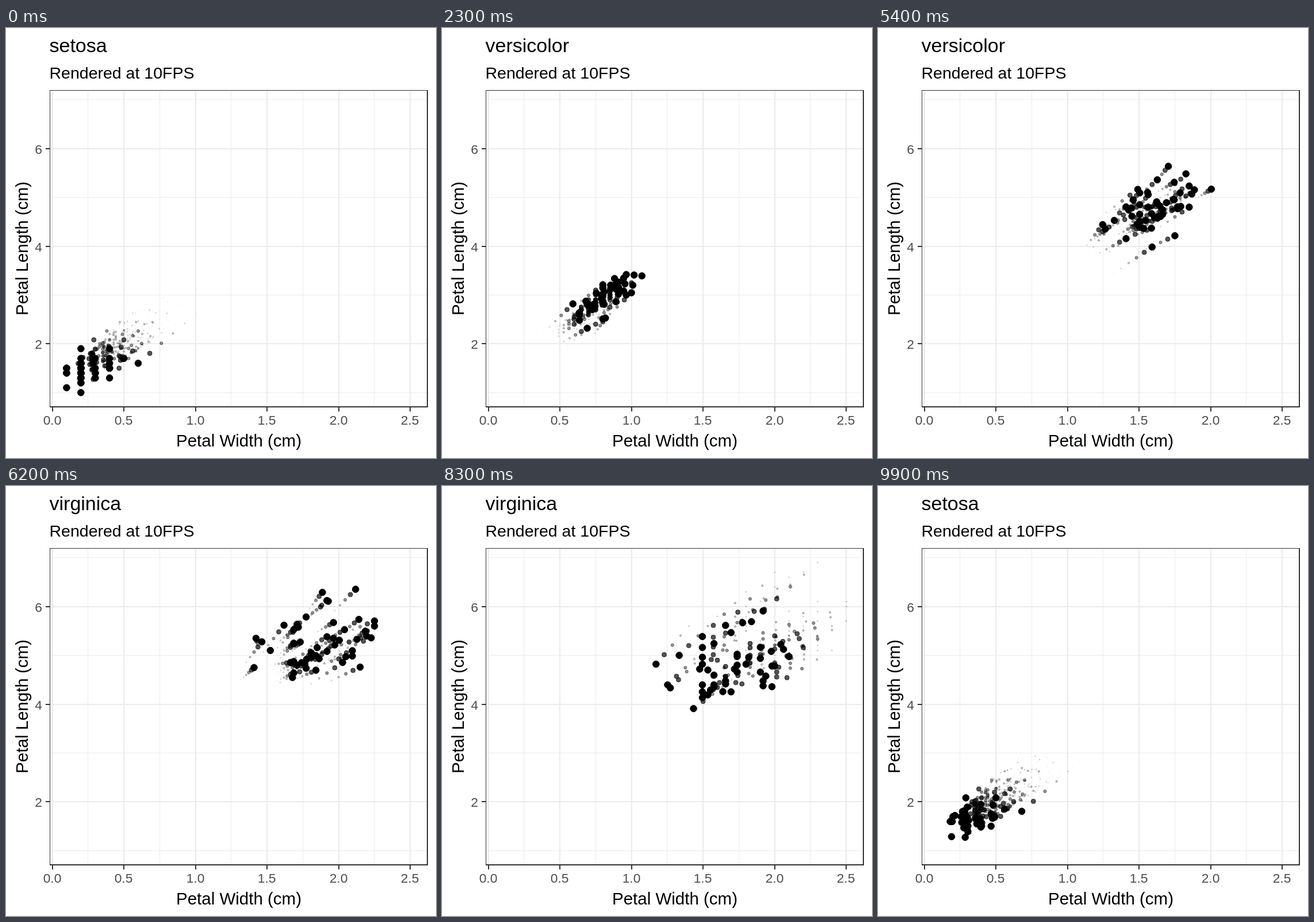
Recreate the animation shown at these times as an HTML page with a canvas. Size 748 px wide and 748 px high, loop 10000 ms.

```html
<!DOCTYPE html>
<html lang="en">
<head>
<meta charset="utf-8">
<title>Iris petals</title>
<style>
html, body { margin: 0; width: 100%; height: 100%; overflow: hidden; background: #fff; }
svg, canvas { position: absolute; left: 0; top: 0; width: 748px; height: 748px; }
text { font-family: "Liberation Sans", Arial, sans-serif; }
.label { font-size: 29.5px; text-anchor: middle; }
.tick { font-size: 22.8px; fill: #4d4d4d; }
</style>
</head>
<body>
<svg viewBox="0 0 748 748">
  <g id="grid" shape-rendering="crispEdges"></g>
  <g fill="#333" shape-rendering="crispEdges">
    <path d="M76 108h658v1H76zM76 108h1v552h-1zM732 108h2v552h-2zM76 658h658v2H76z"/>
  </g>
  <text id="title" x="75.5" y="42" font-size="34"></text>
  <text x="75.5" y="88" font-size="28.5">Rendered at 10FPS</text>
  <text class="label" x="405" y="727.5">Petal Width (cm)</text>
  <text class="label" transform="translate(38 383.5) rotate(-90)">Petal Length (cm)</text>
</svg>
<canvas width="748" height="748"></canvas>
<script>
// Petal sizes in mm, one row per flower
const setosa = {
  w: [2,2,2,2,2,4,3,2,2,1,2,2,1,1,2,4,4,3,3,3,2,4,2,5,2,2,4,2,2,2,2,4,1,2,2,2,2,1,2,2,3,3,2,6,4,3,2,2,2,2],
  l: [14,14,13,15,14,17,14,15,14,15,15,16,14,11,12,15,13,14,17,15,17,15,10,17,19,
      16,16,15,14,16,16,15,15,14,15,12,13,14,13,15,13,13,13,16,19,14,16,14,15,14]
};
const versicolor = {
  w: [14,15,15,13,15,13,16,10,13,14,10,15,10,14,13,14,15,10,15,11,18,13,15,12,13,
      14,14,17,15,10,11,10,12,16,15,16,15,13,13,13,12,14,12,10,13,12,13,13,11,13],
  l: [47,45,49,40,46,45,47,33,46,39,35,42,40,47,36,44,45,41,45,39,48,40,49,47,43,
      44,48,50,45,35,38,37,39,51,45,45,47,44,41,40,44,46,40,33,42,42,42,43,30,41]
};
const virginica = {
  w: [25,19,21,18,22,21,17,18,18,25,20,19,21,20,24,23,18,22,23,15,23,20,20,18,21,
      18,18,18,21,16,19,20,22,15,14,23,24,18,18,21,24,23,19,23,25,23,19,20,23,18],
  l: [60,51,59,56,58,66,45,63,58,61,51,53,55,50,51,53,55,67,69,50,57,49,67,49,57,
      60,48,49,56,58,61,64,56,51,56,61,56,55,48,54,56,51,51,59,57,52,50,52,54,51]
};

const moves = [
  { from: setosa, to: versicolor, start: 11, end: 33 },
  { from: versicolor, to: virginica, start: 45, end: 67 },
  { from: virginica, to: setosa, start: 79, end: 100 }
];
const FRAMES = 100, WAKE = 8;
const px = w => 80.5 + 249.1 * w;
const py = l => 719.1 - 84.9 * l;

const grid = document.getElementById("grid");
const title = document.getElementById("title");
const ctx = document.querySelector("canvas").getContext("2d");

function add(tag, attrs, content = "") {
  const el = document.createElementNS("http://www.w3.org/2000/svg", tag);
  for (const key in attrs) el.setAttribute(key, attrs[key]);
  el.textContent = content;
  grid.append(el);
}
const rect = (x, y, width, height, fill) => add("rect", { x, y, width, height, fill });

function drawGrid() {
  const pale = "#ebebeb", dark = "#333";
  for (let w = 0.25; w < 2.5; w += 0.5) rect(Math.floor(px(w)), 108, 1, 551, pale);
  for (let l = 1; l < 8; l += 2) rect(76, Math.floor(py(l)), 657, 1, pale);
  for (let l = 2; l < 7; l += 2) {
    const y = Math.round(py(l));
    rect(76, y - 1, 657, 2, pale);
    rect(69, y - 1, 7, 2, dark);
    add("text", { class: "tick", x: 63, y: y + 8.5, "text-anchor": "end" }, l);
  }
  for (let w = 0; w < 3; w += 0.5) {
    const x = Math.round(px(w));
    rect(x - 1, 108, 2, 551, pale);
    rect(x - 1, 660, 2, 7, dark);
    add("text", { class: "tick", x: x - 0.5, y: 690, "text-anchor": "middle" }, w.toFixed(1));
  }
}

// strength 1 is a full dot; older echoes shrink and fade
function drawFlowers(frame, strength) {
  const f = (frame + FRAMES) % FRAMES;
  const { from, to, start, end } = moves.find(m => f < m.end);
  const p = Math.max(0, (f - start) / (end - start));
  const radius = 0.3 + 5.5 * strength;
  ctx.globalAlpha = strength;
  from.w.forEach((w, i) => {
    const x = px((w + (to.w[i] - w) * p) / 10);
    const y = py((from.l[i] + (to.l[i] - from.l[i]) * p) / 10);
    ctx.beginPath();
    ctx.arc(x, y, radius, 0, 2 * Math.PI);
    ctx.fill();
    ctx.stroke();
  });
}

function draw(frame) {
  title.textContent = frame < 23 || frame > 90 ? "setosa" : frame < 57 ? "versicolor" : "virginica";
  ctx.clearRect(0, 0, 748, 748);
  for (let age = WAKE - 1; age >= 0; age--) drawFlowers(frame - age, (1 - age / WAKE) ** 3);
}

drawGrid();
let shown = -1;
const began = performance.now();
function tick() {
  const frame = Math.floor((performance.now() - began) / 100) % FRAMES;
  if (frame !== shown) draw(shown = frame);
  requestAnimationFrame(tick);
}
tick();
</script>
</body>
</html>
```
